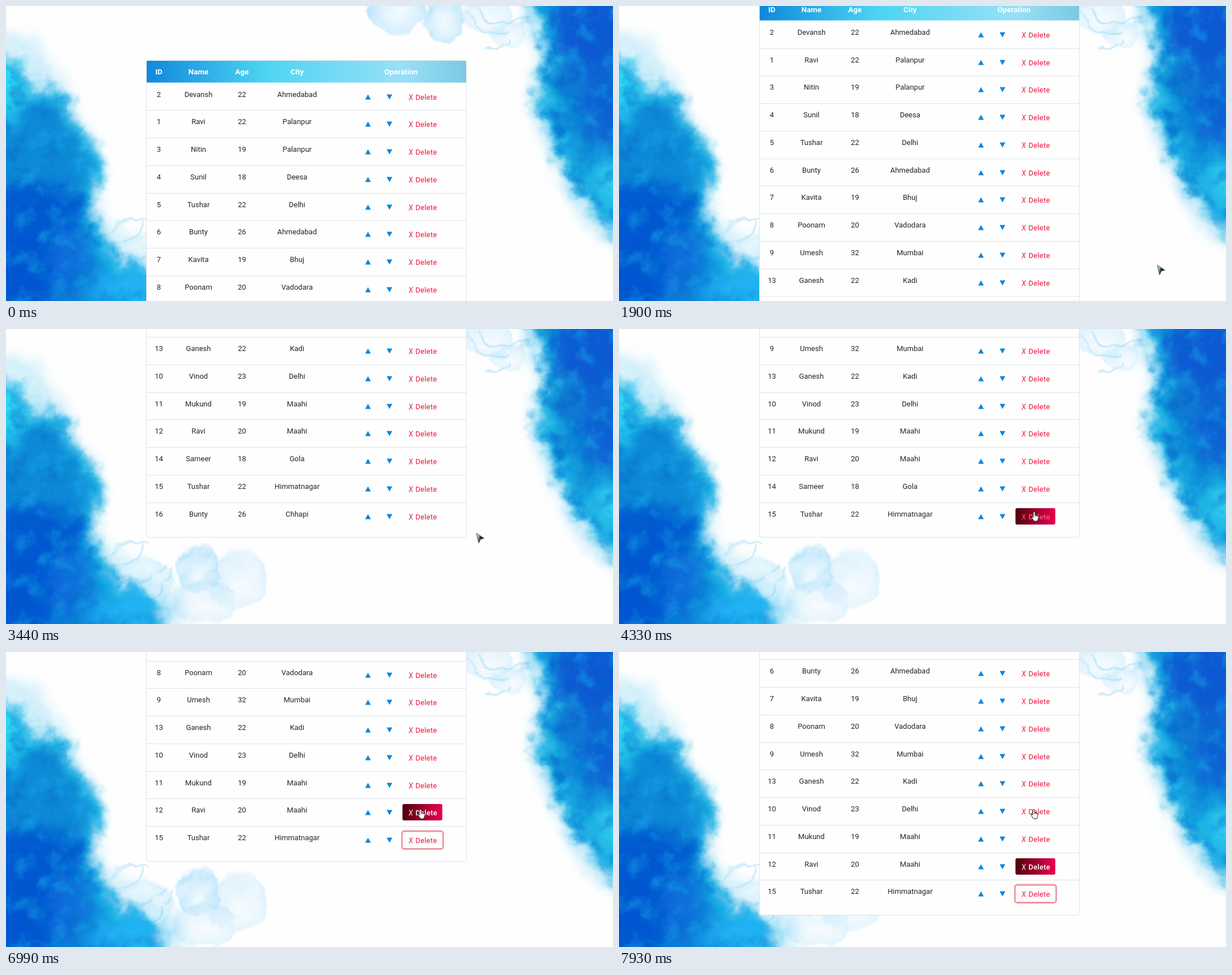
An HTML page for the animation above (8000 ms loop, 1074x522 px).

```html
<!DOCTYPE html>
<html lang="en">
<head>
<meta charset="utf-8">
<title>Table</title>
<style>
html, body { margin: 0; width: 100%; height: 100%; overflow: hidden; background: #fefefe; }
svg { position: absolute; left: 0; top: 0; width: 1074px; height: 522px; }
#back { will-change: transform; }
text { font: 13px Roboto, "Open Sans", sans-serif; fill: #212529; text-anchor: middle; }
.head text { font-size: 13.4px; font-weight: 700; fill: #fff; }
.del { text-anchor: start; letter-spacing: .25px; }
</style>
</head>
<body>
<svg id="back" viewBox="0 0 1074 522">
  <defs>
    <filter id="ink" filterUnits="userSpaceOnUse" x="-60" y="-60" width="1194" height="642" color-interpolation-filters="sRGB">
      <feTurbulence type="fractalNoise" baseFrequency=".028" numOctaves="5" seed="7"/>
      <feColorMatrix values="1 0 0 0 0  0 1 0 0 0  0 0 1 0 0  0 0 0 0 1" result="n"/>
      <feDisplacementMap in="SourceGraphic" in2="n" scale="46" xChannelSelector="R" yChannelSelector="G" result="d"/>
      <feColorMatrix in="n" values="0 0 0 0 .02  0 0 0 0 .4  0 0 0 0 .8  1.6 0 0 0 -.8"/>
      <feComposite in2="d" operator="in" result="dark"/>
      <feColorMatrix in="n" values="0 0 0 0 .1  0 0 0 0 .7  0 0 0 0 .93  0 0 1.4 0 -.7"/>
      <feComposite in2="d" operator="in" result="lite"/>
      <feMerge><feMergeNode in="d"/><feMergeNode in="dark"/><feMergeNode in="lite"/></feMerge>
    </filter>
    <filter id="smoke" filterUnits="userSpaceOnUse" x="-60" y="-60" width="1194" height="642" color-interpolation-filters="sRGB">
      <feTurbulence type="fractalNoise" baseFrequency=".022" numOctaves="4" seed="12"/>
      <feColorMatrix values="1 0 0 0 0  0 1 0 0 0  0 0 1 0 0  0 0 0 0 1" result="n"/>
      <feDisplacementMap in="SourceGraphic" in2="n" scale="26" xChannelSelector="R" yChannelSelector="G" result="d"/>
      <feColorMatrix in="n" values="0 0 0 0 1  0 0 0 0 1  0 0 0 0 1  0 2.4 0 0 -1"/>
      <feComposite in2="d" operator="in" result="w"/>
      <feMerge><feMergeNode in="d"/><feMergeNode in="w"/></feMerge>
    </filter>
    <filter id="b1"><feGaussianBlur stdDeviation="1.2"/></filter>
    <filter id="b6" x="-50%" y="-50%" width="200%" height="200%"><feGaussianBlur stdDeviation="6"/></filter>
    <filter id="b10" x="-50%" y="-50%" width="200%" height="200%"><feGaussianBlur stdDeviation="10"/></filter>
    <filter id="b16" x="-80%" y="-80%" width="260%" height="260%"><feGaussianBlur stdDeviation="16"/></filter>
    <radialGradient id="puff" cx=".55" cy=".6" r=".6">
      <stop offset="0" stop-color="#dff3fe" stop-opacity=".4"/>
      <stop offset=".65" stop-color="#b4e2fb" stop-opacity=".65"/>
      <stop offset=".85" stop-color="#a8ddfb" stop-opacity=".8"/>
      <stop offset="1" stop-color="#cdecfd" stop-opacity=".2"/>
    </radialGradient>
  </defs>
  <rect width="1074" height="522" fill="#fefefe"/>
  <g filter="url(#smoke)">
    <g fill="#8fdaf5" filter="url(#b10)">
      <path opacity=".4" d="M-50 48 30 45 66 75 98 130 122 190 156 235 172 290 166 350 182 395 225 405 270 435 305 470 330 560-50 560Z"/>
      <path opacity=".5" d="M900-50 926 40 942 95 926 150 936 210 958 262 986 320 1008 360 1042 400 1070 425 1130 430 1130-50Z"/>
    </g>
    <g fill="url(#puff)" filter="url(#b1)">
      <ellipse cx="690" cy="2" rx="50" ry="50"/><ellipse cx="774" cy="22" rx="38" ry="42"/>
      <ellipse cx="338" cy="424" rx="40" ry="42"/>
      <g opacity=".55">
        <ellipse cx="408" cy="444" rx="54" ry="52"/><ellipse cx="350" cy="480" rx="58" ry="40"/>
        <ellipse cx="240" cy="450" rx="54" ry="46"/><ellipse cx="82" cy="147" rx="16" ry="18"/>
        <ellipse cx="1012" cy="314" rx="22" ry="24"/><ellipse cx="850" cy="15" rx="42" ry="34"/>
        <ellipse cx="890" cy="52" rx="34" ry="26"/>
      </g>
    </g>
    <g fill="none" stroke="#64c3f2" stroke-width="2.5" opacity=".5" filter="url(#b1)">
      <path d="M820 12C828 40 850 54 885 46M832 4C850 30 880 36 912 18M846 72C870 80 888 74 886 60"/>
      <path d="M184 402C200 378 225 374 250 380M190 420C215 428 232 410 238 382M205 450C235 440 260 455 282 420M230 470C262 474 285 455 292 425"/>
    </g>
  </g>
  <g filter="url(#ink)">
    <g fill="#1ab0e3" filter="url(#b10)">
      <path d="M-60 92 12 95 44 140 88 152 112 180 122 215 150 240 167 275 164 320 150 350 156 385 182 415 200 448 240 470 275 490 285 570-60 570Z"/>
      <path d="M918-60 930 0 946 45 962 85 946 125 934 160 944 190 962 220 974 255 986 295 1004 318 1030 345 1062 392 1134 415 1134-60Z"/>
    </g>
    <g fill="#0b8ad6" filter="url(#b10)">
      <path d="M-60 190 20 185 60 168 98 180 104 215 126 245 145 285 134 330 130 375 152 420 166 455 190 490 200 570-60 570Z"/>
      <path d="M930-60 946 0 964 40 980 90 962 125 976 160 978 200 1000 240 1004 280 1040 290 1134 270 1134-60Z"/>
    </g>
    <g filter="url(#b16)">
      <ellipse cx="-2" cy="145" rx="26" ry="44" fill="#2fe0f7"/>
      <ellipse cx="50" cy="372" rx="84" ry="62" fill="#0559d0"/>
      <ellipse cx="15" cy="475" rx="90" ry="70" fill="#0456d0"/>
      <ellipse cx="112" cy="455" rx="36" ry="64" fill="#0b6fdd"/>
      <ellipse cx="205" cy="505" rx="60" ry="30" fill="#20b2f7"/>
      <ellipse cx="1040" cy="45" rx="70" ry="75" fill="#0759d3"/>
      <ellipse cx="1060" cy="180" rx="46" ry="62" fill="#0861d4"/>
      <ellipse cx="1000" cy="125" rx="22" ry="36" fill="#0a73cf"/>
      <ellipse cx="1074" cy="308" rx="22" ry="36" fill="#37d8f4"/>
    </g>
  </g>
</svg>
<svg id="page" viewBox="0 0 1074 522">
  <defs>
    <linearGradient id="bar">
      <stop offset="0" stop-color="#1088dc"/><stop offset=".37" stop-color="#4dd4f3"/>
      <stop offset=".8" stop-color="#98e0f7"/><stop offset="1" stop-color="#7bc9e3"/>
    </linearGradient>
    <linearGradient id="red"><stop offset="0" stop-color="#4f0008"/><stop offset="1" stop-color="#ea0050"/></linearGradient>
    <linearGradient id="steel" x2="1" y2=".35">
      <stop offset=".1" stop-color="#eef2f3"/><stop offset=".4" stop-color="#86989c"/><stop offset=".6" stop-color="#0b2a33"/>
    </linearGradient>
  </defs>
  <rect id="frame" x="248.5" width="566" rx="3" fill="#fefefe" stroke="#dee2e6"/>
  <g id="head" class="head"><rect x="249" y="97" width="565" height="38.5" fill="url(#bar)"/></g>
  <g id="rows"></g>
  <g id="arrow"><path d="M.5.5 14 9.5 7.5 11 4.5 18Z" fill="url(#steel)" stroke="#4a5558" stroke-linejoin="round"/></g>
  <g id="hand"><path d="M-1 2Q-1 .3.7.3 2.2.3 2.2 2V6.2L7 7.2Q8.6 7.6 8.4 9.4L7.6 13 6.4 17H.4L-3.6 11.2Q-4.4 9.4-3 9L-1 10.6Z" fill="#fff" stroke="#222" stroke-linejoin="round"/><path d="M2.2 6.2V9M4.6 6.8V9.2M6.6 7.3V9.6" stroke="#222" stroke-width=".8"/></g>
</svg>
<script>
const LOOP = 8000, PITCH = 48.75, TOP = 136, FADE = 200;
const COLS = [270.5, 340.5, 417.5, 515, 699];
const DATA = `2 Devansh 22 Ahmedabad
1 Ravi 22 Palanpur
3 Nitin 19 Palanpur
4 Sunil 18 Deesa
5 Tushar 22 Delhi
6 Bunty 26 Ahmedabad
7 Kavita 19 Bhuj
8 Poonam 20 Vadodara
9 Umesh 32 Mumbai
13 Ganesh 22 Kadi
10 Vinod 23 Delhi
11 Mukund 19 Maahi
12 Ravi 20 Maahi
14 Sameer 18 Gola
15 Tushar 22 Himmatnagar
16 Bunty 26 Chhapi`.split("\n").map(line => line.split(" "));

// start, end, steps, then the new value
const SCROLL = [
  [1690, 2460, 12, 258, p => p ** .78],
  [2530, 2730, 4, 420, p => p ** 2.2],
  [2930, 3230, 5, 560.25, p => p * p * (3 - 2 * p)],
  [4270, 4270, 1, 511.5],
  [5900, 5900, 1, 462.75],
  [6990, 7260, 5, 406, p => p ** 2.2],
  [7460, 7930, 8, 366, p => p * p * (3 - 2 * p)]
];
const POINTER = [
  [530, 670, 3, 1053, 512],
  [1220, 1360, 3, 952, 458],
  [3370, 3440, 2, 832, 361],
  [3510, 3650, 3, 734, 323],
  [4670, 4880, 4, 732, 294],
  [5080, 5080, 1, 737, 294],
  [5280, 5410, 3, 743, 298],
  [5480, 5600, 3, 733, 278]
];
const REMOVED = { 16: 4270, 14: 5900 };
const HOVER = [[16, 3580, 4270], [15, 4270, 4740], [14, 5480, 5900], [12, 5900, LOOP]];
const RING = [[16, 4130, 4270], [14, 5780, 5900], [15, 5900, LOOP]];

const $ = id => document.getElementById(id);
const clamp = v => Math.max(0, Math.min(1, v));
const mix = (a, b, p) => a + (b - a) * p;
const during = (t, [, from, to]) => t >= from && t < to;

function add(parent, tag, attrs, content) {
  const el = document.createElementNS("http://www.w3.org/2000/svg", tag);
  for (const key in attrs) el.setAttribute(key, attrs[key]);
  if (content) el.textContent = content;
  parent.append(el);
  return el;
}

["ID", "Name", "Age", "City", "Operation"].forEach((label, i) =>
  add($("head"), "text", { x: COLS[i], y: 121 }, label));

const rows = DATA.map((cells, i) => {
  const g = add($("rows"), "g", {});
  if (i) add(g, "path", { d: "M249 .5H814", stroke: "#dee2e6" });
  cells.forEach((cell, k) => add(g, "text", { x: COLS[k], y: 25 }, cell));
  add(g, "path", { d: "M635.5 29.5 640.5 20.5 645.5 29.5ZM673.5 20.5H683.5L678.5 29.5Z", fill: "#0f86d8" });
  const fill = add(g, "rect", { x: 701.5, y: 10, width: 70.5, height: 29, rx: 3, fill: "url(#red)" });
  const ring = add(g, "rect", { x: 700.5, y: 9, width: 73, height: 31.5, rx: 4, fill: "none", stroke: "#f0959f", "stroke-width": 2.8 });
  const cross = add(g, "path", { d: "M713 30.5 719.5 20M713.8 20.2 718.8 30.3", fill: "none", "stroke-width": 1.1 });
  const label = add(g, "text", { x: 724.5, y: 29.6, class: "del" }, "Delete");
  return { id: +cells[0], g, fill, ring, cross, label };
});

const stepped = (t, [from, to, n]) =>
  t < from ? 0 : n < 2 ? 1 : Math.min(n, Math.floor((t - from) / (to - from) * (n - 1) + 1e-6) + 1) / n;

function scrollAt(t) {
  let y = 0;
  for (const s of SCROLL) {
    const p = stepped(t, s);
    if (p) y = mix(y, s[3], s[4] ? s[4](p) : p);
  }
  return y;
}

function pointerAt(t) {
  let x = 1030, y = 530;
  for (const s of POINTER) {
    const p = stepped(t, s);
    x = mix(x, s[3], p);
    y = mix(y, s[4], p);
  }
  return [x, y];
}

const show = (el, on) => el.setAttribute("visibility", on ? "inherit" : "hidden");
const move = (el, x, y) => el.setAttribute("transform", `translate(${x} ${y})`);

function draw(t) {
  const scroll = scrollAt(t);
  let count = 0;
  for (const r of rows) {
    const gone = t >= (REMOVED[r.id] || LOOP);
    r.g.setAttribute("visibility", gone ? "hidden" : "visible");
    if (gone) continue;
    move(r.g, 0, Math.floor(TOP + PITCH * count++ - scroll));
    const hovers = HOVER.filter(h => h[0] === r.id);
    const hot = hovers.some(h => during(t, h));
    const white = clamp(hovers.reduce((sum, h) => sum + clamp((t - h[1]) / FADE) - clamp((t - h[2]) / FADE), 0));
    const ink = `rgb(${[237, 20, 61].map(c => Math.round(mix(c, 255, white)))})`;
    show(r.fill, hot);
    show(r.ring, RING.some(s => s[0] === r.id && during(t, s)));
    r.cross.setAttribute("stroke", ink);
    r.label.style.fill = ink;
    r.label.style.fontWeight = hot ? 500 : 400;
  }
  const top = Math.round(96 - scroll) + .5;
  const bottom = Math.floor(TOP + PITCH * count + 12.75 - scroll) + .5;
  $("frame").setAttribute("y", top);
  $("frame").setAttribute("height", bottom - top);
  move($("head"), 0, -Math.round(scroll));

  const [x, y] = pointerAt(t);
  const hand = HOVER.some(h => during(t, h));
  show($("hand"), hand);
  show($("arrow"), !hand);
  move($("hand"), x, y);
  move($("arrow"), x, y);
}

function tick() {
  draw(performance.now() % LOOP);
  requestAnimationFrame(tick);
}
tick();
</script>
</body>
</html>
```
